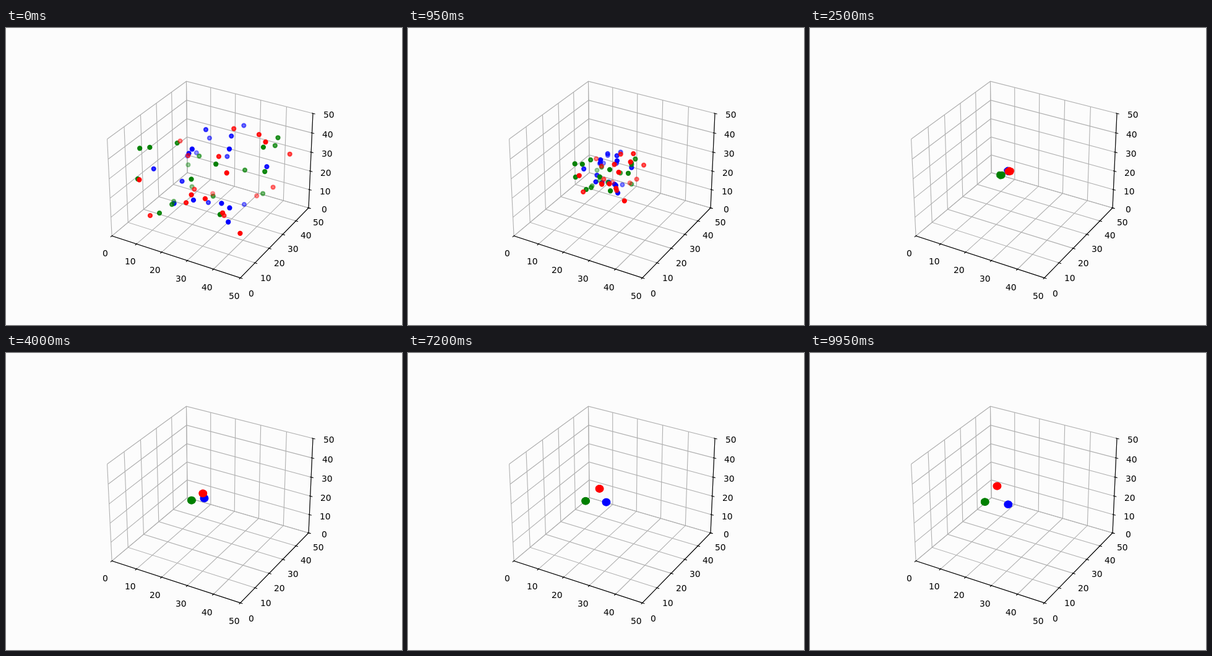
An HTML page with a canvas for the animation above (10 s loop, 640 px wide and 480 px high).

```html
<!DOCTYPE html>
<html lang="en">
<head>
<meta charset="utf-8">
<title>3D swarm</title>
<style>
  html, body { margin: 0; height: 100%; overflow: hidden; background: #fcfcfc; }
  canvas { display: block; }
</style>
</head>
<body>
<canvas id="stage" width="640" height="480"></canvas>
<script>
const ctx = document.getElementById("stage").getContext("2d");
const LOOP = 10000, STEP = 50, GATHER = 2800, COUNT = 20;

let seed = 7;
function random(min, max) {
  seed = (seed * 16807) % 2147483647;
  return min + (max - min) * seed / 2147483647;
}

// Perspective view of the 50-unit box: elevation 30°, azimuth -60°.
function project(x, y, z) {
  const a = (x / 50 - 0.5) * 1.1905, b = (y / 50 - 0.5) * 1.1905, c = (z / 50 - 0.5) * 0.8929;
  const near = 0.433 * a - 0.75 * b + 0.5 * c, k = 1998 / (10 - near);
  return [333 + (0.866 * a + 0.5 * b) * k, 237.4 - (-0.25 * a + 0.433 * b + 0.866 * c) * k, near];
}

function line(color, ...points) {
  ctx.beginPath();
  for (const p of points) {
    const [x, y] = project(...p);
    ctx.lineTo(x, y);
  }
  ctx.strokeStyle = color;
  ctx.stroke();
}

function label(value, point, dx, dy) {
  const [x, y] = project(...point);
  const left = x + dx - ctx.measureText(value).width / 2;
  ctx.fillText(value, Math.round(left), Math.round(y + dy + 5));
}

function drawAxes() {
  ctx.lineWidth = 1.11;
  ctx.font = "13.9px 'DejaVu Sans', sans-serif";
  ctx.fillStyle = "#000";
  for (let v = 0; v <= 50; v += 10) {
    line("#b0b0b0", [v, 0, 0], [v, 50, 0], [v, 50, 50]);
    line("#b0b0b0", [50, v, 0], [0, v, 0], [0, v, 50]);
    line("#b0b0b0", [0, 0, v], [0, 50, v], [50, 50, v]);
  }
  line("#000", [0, 0, 0], [50, 0, 0], [50, 50, 0], [50, 50, 50]);
  for (let v = 0; v <= 50; v += 10) {
    line("#000", [v, -0.83, 0], [v, 0.42, 0]);
    line("#000", [49.58, v, 0], [50.83, v, 0]);
    line("#000", [49.58, 50, v], [50.83, 50, v]);
    label(v, [v, 0, 0], -10.3, 28 + v / 40);
    label(v, [50, v, 0], 18 - v / 20, 25 - v / 25);
    label(v, [50, 50, v], 25.5, 2.3);
  }
}

// Far members come first and are fainter.
function scatter() {
  const coord = () => random(5, 45);
  return Array.from({ length: COUNT }, () => project(coord(), coord(), coord()))
    .sort((p, q) => p[2] - q[2])
    .map(([x, y], i) => ({
      x, y,
      alpha: 0.35 + 0.65 * Math.sin(i / (COUNT - 1) * Math.PI / 2),
      haste: random(1.7, 2.4)
    }));
}

// Each swarm's centre follows a quadratic Bézier over the loop.
const swarms = [
  { color: "#00f", path: [[320.3, 224.1], [320.6, 239.6], [320.3, 244.8]] },
  { color: "#008000", path: [[327.6, 237.6], [284.8, 237.6], [282.7, 240.7]] },
  { color: "#f00", path: [[330, 240.5], [314.8, 220.8], [302.3, 215]] }
].map(swarm => ({ ...swarm, members: scatter() }));

function centre([from, bend, to], s) {
  return [0, 1].map(i => (1 - s) ** 2 * from[i] + 2 * s * (1 - s) * bend[i] + s * s * to[i]);
}

function drawSwarm({ color, path, members }, t) {
  const [cx, cy] = centre(path, t / LOOP);
  const left = Math.max(0, 1 - t / GATHER);
  ctx.fillStyle = ctx.strokeStyle = color;
  ctx.lineWidth = 2.08;
  members.forEach(({ x, y, alpha, haste }, i) => {
    const spread = left ** haste;
    const px = cx + (x - path[0][0]) * spread + 2.8 * Math.cos(i) * (1 - spread);
    const py = cy + (y - path[0][1]) * spread + 2.2 * Math.sin(i) * (1 - spread);
    ctx.globalAlpha = alpha;
    ctx.beginPath();
    ctx.arc(px, py, 3.1, 0, 2 * Math.PI);
    ctx.fill();
    ctx.stroke();
  });
  ctx.globalAlpha = 1;
}

function frame() {
  const t = Math.floor(performance.now() % LOOP / STEP) * STEP;
  ctx.fillStyle = "#fcfcfc";
  ctx.fillRect(0, 0, 640, 480);
  drawAxes();
  for (const swarm of swarms) drawSwarm(swarm, t);
  requestAnimationFrame(frame);
}
frame();
</script>
</body>
</html>
```
